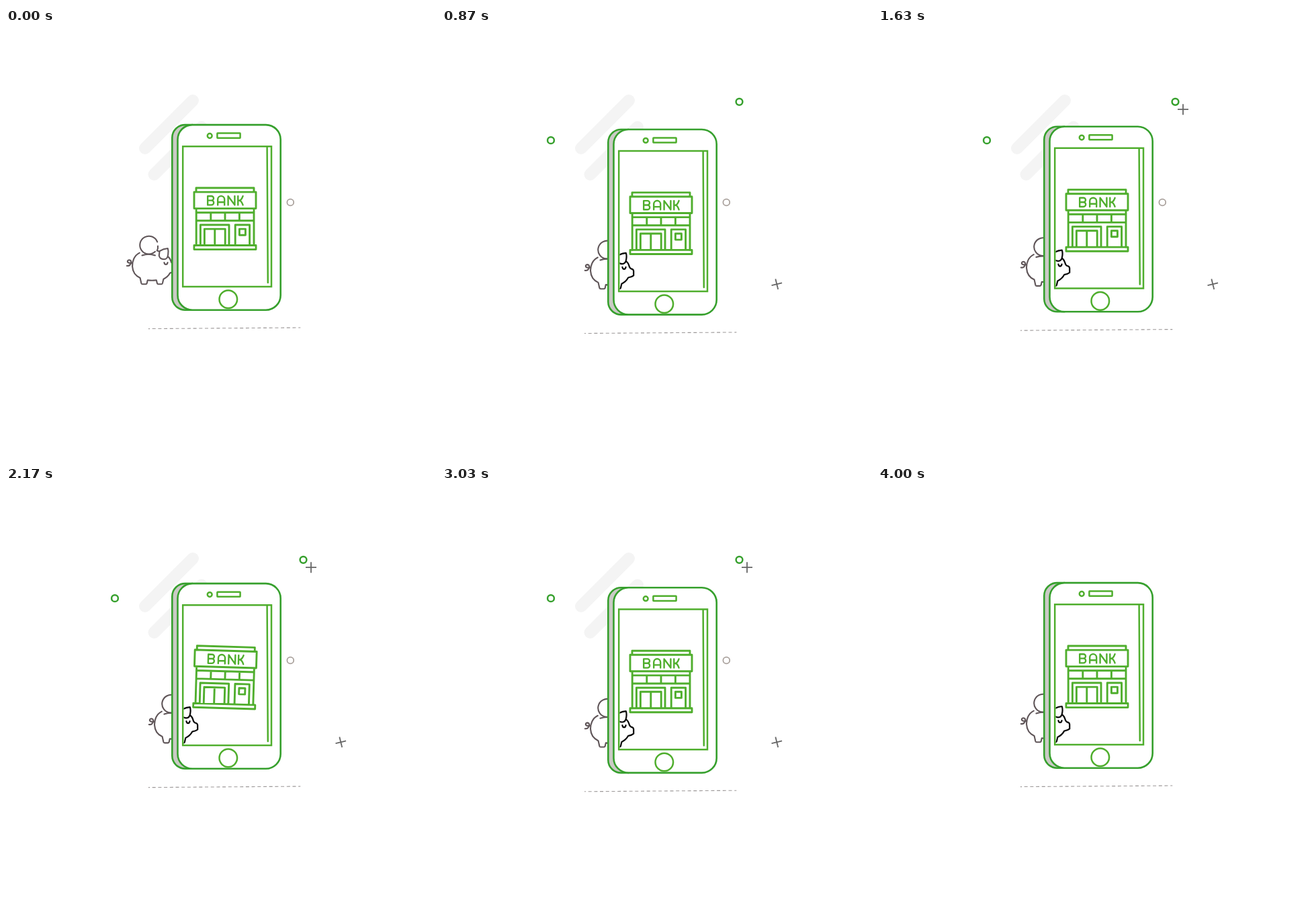
These frames come from a looping animation (640 by 640 pixels, 4030 ms). An HTML page:

```html
<!DOCTYPE html>
<html lang="en">
<head>
<meta charset="utf-8">
<title>Mobile bank</title>
<style>
  html, body { margin: 0; width: 100%; height: 100%; overflow: hidden; background: #fff; }
  svg { display: block; width: 100vw; height: 100vh; fill: none; stroke-linecap: round; stroke-linejoin: round; }
  .case { stroke: #36a02d; stroke-width: 2.6; }
  .line { stroke: #4fae2d; stroke-width: 2.5; }
  .bank { stroke: #4fae2d; stroke-width: 2.9; }
  .ring { stroke: #36a02d; stroke-width: 2.5; }
  .plus { stroke: #666; stroke-width: 1.8; stroke-linecap: butt; }
</style>
</head>
<body>
<svg viewBox="0 0 640 640">
  <defs>
    <clipPath id="screenClip"><rect x="264.4" y="177" width="124" height="207"/></clipPath>
    <g id="pig">
      <path d="M225.2 318.4A13.4 13.4 0 1 0 222 332.8M226 324.5Q226.6 328.5 224.8 331.5"/>
      <path d="M202.5 338.5Q212 335 222 338.5"/>
      <path d="M198.8 334.6C191 338.5 187.6 347 188.1 355C188.6 363 193 369 199.6 372L201.4 380Q201.8 381.3 203.3 381.3H208Q209.4 381.3 209.7 380L210.8 375.2Q217 376.2 223.8 375.2L225 380Q225.3 381.3 226.8 381.3H231Q232.5 381.3 232.9 380L234.4 373.8Q241 370.5 244.2 364.6Q249.5 363.8 252.2 361.4V355Q252 352 248.5 351.4Q246.2 350.4 245.3 346.6Q244.3 343 241.6 340.6"/>
      <path d="M179.8 354Q184.6 354.6 186 349.6Q186.8 345.3 183.4 345.2Q180.2 345.8 181 348.4Q182.6 350.6 188 349.6"/>
      <path d="M225.8 331.6Q227.2 333 229 331.8Q234 328.6 240.8 328Q242.2 332 241.2 337.5Q240.4 344.3 235 344.3Q228.6 343.8 227.8 338.6L228.6 332.4"/>
      <path d="M235.4 349Q236 352 238 352Q240 352 240.6 349"/>
    </g>
    <path id="cross" d="M-8 0H8M0 -8V8"/>
  </defs>

  <g id="decor">
    <path d="M207 179L278 108M220.5 218L291 147.5" stroke="#f4f4f4" stroke-width="18"/>
    <circle cx="423.3" cy="259.5" r="4.9" stroke="#aaa29d" stroke-width="1.8"/>
    <g id="pops">
      <g data-at="300" data-x="498.3" data-y="381.3"><use href="#cross" class="plus" transform="rotate(-14)"/></g>
      <g data-at="600" data-x="162" data-y="167.2"><circle r="4.9" class="ring"/></g>
      <g data-at="700" data-x="442.5" data-y="109.8"><circle r="4.9" class="ring"/></g>
      <g data-at="930" data-x="454" data-y="121.2"><use href="#cross" class="plus"/></g>
    </g>
  </g>

  <g id="float">
    <path d="M212 447.6L438.3 446" stroke="#9c9898" stroke-width="1.1" stroke-dasharray="5 3.7" stroke-dashoffset="3" stroke-linecap="butt"/>
    <use href="#pig" class="pig" stroke="#5f5558" stroke-width="2.1"/>
    <path class="case" fill="#cacac5" d="M277.5 144.1H266.5A19.2 19.2 0 0 0 247.3 163.3V400.5A19.2 19.2 0 0 0 266.5 419.7H277.5Z"/>
    <rect class="case" fill="#fff" x="255.5" y="144.1" width="153.2" height="275.6" rx="22"/>
    <g class="line">
      <circle cx="303.2" cy="160.5" r="3.4"/>
      <rect x="314.4" y="156.6" width="34.2" height="7.1" rx=".5"/>
      <circle cx="330.8" cy="403.8" r="13.3"/>
    </g>
    <g clip-path="url(#screenClip)"><use href="#pig" class="pig" stroke="#080808" stroke-width="2.2"/></g>
    <path class="line" stroke-linejoin="miter" d="M263.2 176.2H395V385H263.2ZM388.6 176.8L389.8 379"/>
    <g id="bank" class="bank">
      <path d="M283 238H369V244.1H283ZM280 244.1H372V268.6H280ZM283.2 268.6V323.5M369 268.6V323.5M283.2 274.7H369M283.2 286.8H369M304.8 274.7V286.8M326 274.7V286.8M347.4 274.7V286.8"/>
      <path d="M280 323.5H372V329.6H280ZM289.4 323.5V293H332V323.5M295.4 323.5V299.1H326.2V323.5M310.8 299.1V323.5M341.2 323.5V293H362.6V323.5M347.4 299.1H356.4V308.2H347.4Z"/>
      <g role="img" aria-label="BANK" stroke-width="2.4">
        <path d="M300.2 250.2H305.8A3.2 3.2 0 0 1 305.8 256.6H300.2M305.8 256.6A3.4 3.4 0 0 1 305.8 263.4H300.2V250.2"/>
        <path d="M315.2 263.4V255.2A5 5.1 0 0 1 325.2 255.2V263.4M315.2 259.2H325.2"/>
        <path d="M330.6 263.4V250.2L340.4 263.4V250.2"/>
        <path d="M345.3 250.2V263.4M345.3 256.8H347.6Q350.6 256 352.6 250.2M347.6 256.8Q350.6 257.6 352.6 263.4"/>
      </g>
    </g>
  </g>
</svg>
<script>
  const LOOP = 4030, DECOR_END = 3995, POP = 120;
  // Each track lists [time in ms, value].
  const bob = [[0, 0], [1000, 7.2], [2000, 0.6], [3004, 7.2], [LOOP, 0]];
  const tilt = [[0, 0], [1750, 0], [2170, 1.7], [2600, 0], [3100, 0], [3430, 0.65], [3750, 0]];
  const slide = [[0, 0], [560, 33]];

  const ease = u => (1 - Math.cos(Math.PI * u)) / 2;
  const clamp = u => Math.min(1, Math.max(0, u));

  function valueAt(track, t) {
    const next = track.findIndex(key => key[0] > t);
    if (next < 0) return track[track.length - 1][1];
    const [t0, a] = track[next - 1], [t1, b] = track[next];
    return a + (b - a) * ease((t - t0) / (t1 - t0));
  }

  const el = id => document.getElementById(id);
  const place = (node, value) => node.setAttribute('transform', value);
  const show = (node, on) => node.setAttribute('visibility', on ? 'visible' : 'hidden');
  const phone = el('float'), bank = el('bank'), decor = el('decor');
  const pigs = document.querySelectorAll('.pig');
  const pops = [...el('pops').children];

  function draw(t) {
    place(phone, `translate(0 ${valueAt(bob, t)})`);
    place(bank, `rotate(${valueAt(tilt, t)} 326 284)`);
    pigs.forEach(pig => place(pig, `translate(${valueAt(slide, t)} 0)`));
    decor.style.display = t < DECOR_END ? '' : 'none';
    for (const pop of pops) {
      const { at, x, y } = pop.dataset;
      const size = ease(clamp((t - at) / POP));
      show(pop, size > 0);
      place(pop, `translate(${x} ${y}) scale(${size})`);
    }
  }

  const start = performance.now();
  function tick() {
    draw((performance.now() - start) % LOOP);
    requestAnimationFrame(tick);
  }
  draw(0);
  requestAnimationFrame(tick);
</script>
</body>
</html>
```
